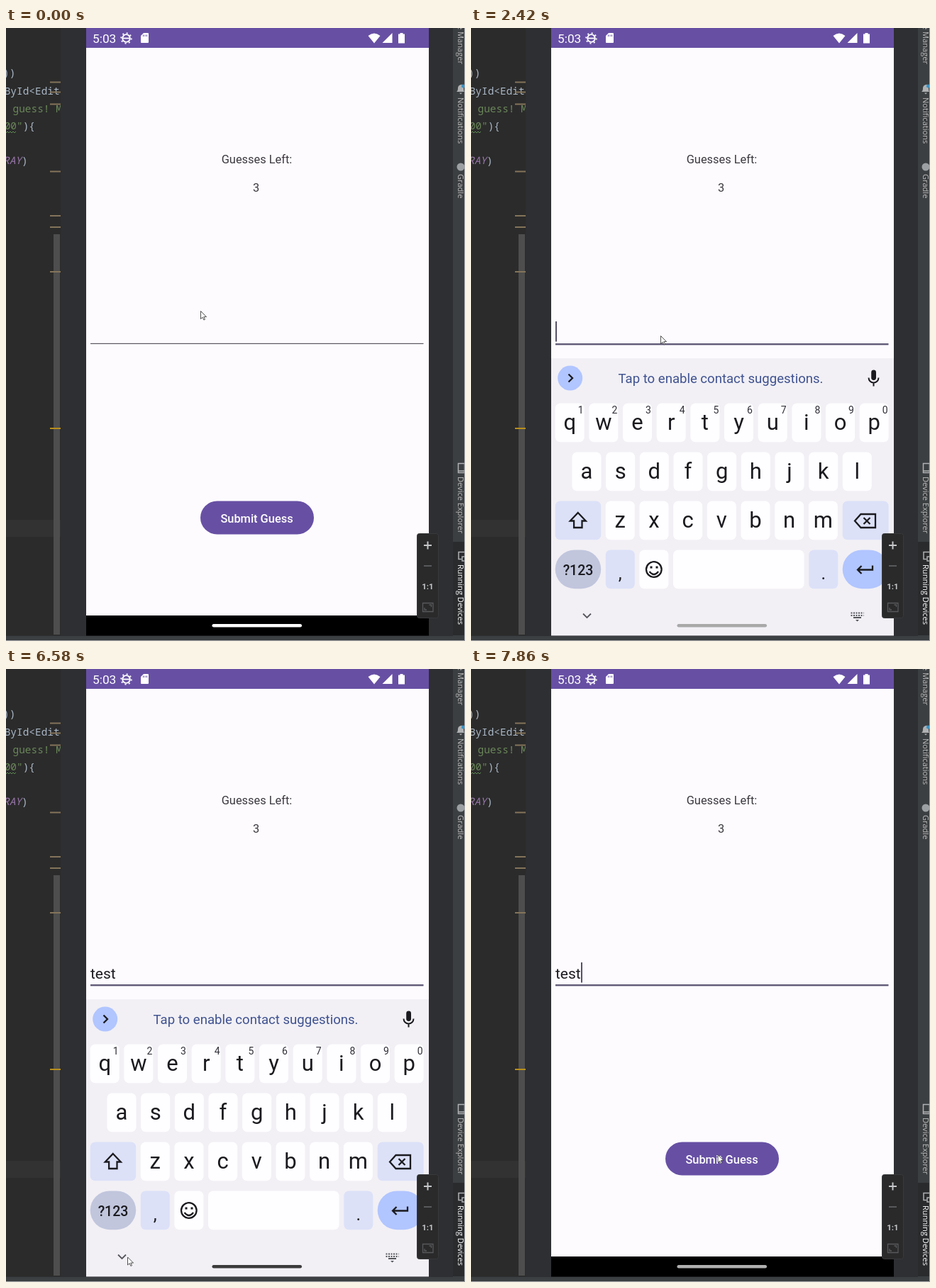
Animation, 647 px wide and 865 px high, one loop 7990 ms. Source, as an HTML page:

```html
<!DOCTYPE html>
<html lang="en">
<head>
<meta charset="utf-8">
<title>Guess input</title>
<style>
  html, body { margin: 0; width: 100%; height: 100%; overflow: hidden; background: #2e2f32; }
  svg { display: block; width: 647px; height: 865px; }
  text { font-family: Roboto, sans-serif; white-space: pre; }
  .mid { text-anchor: middle; }
  .code text { font: 14.45px "Noto Sans Mono", monospace; fill: #a9b7c6; }
  .side text { font: 11.1px "Open Sans", sans-serif; fill: #bbb; }
  .line { fill: none; stroke-width: 2.3; stroke: #1b1b1f; }
</style>
</head>
<body>
<svg viewBox="0 0 647 865">
  <defs>
    <clipPath id="editorClip"><path d="M0 0H77V857H0Z"/></clipPath>
    <clipPath id="phoneClip"><path d="M113 0H596V857.5H113Z"/></clipPath>
  </defs>

  <!-- Editor -->
  <g clip-path="url(#editorClip)" class="code">
    <path fill="#2b2b2b" d="M0 0H77V857H0Z"/>
    <path fill="#323232" d="M0 694H77V718H0Z"/>
    <text x="-4" y="68">))</text>
    <text x="-2.3" y="94">ById&lt;Edit</text>
    <text x="9.5" y="119" style="fill:#6a8759">guess! M</text>
    <text x="-2.3" y="143"><tspan fill="#6a8759">00"</tspan>){</text>
    <text x="-4" y="192"><tspan fill="#9876aa" font-style="italic">RAY</tspan>)</text>
    <path fill="none" stroke="#5f8a53" d="M0 148l2-2 2 2 2-2 2 2 2-2 2 2 2-2"/>
    <path fill="#4e4e4e" d="M67 291H76V856H67Z"/>
    <path stroke="#84745a" stroke-width="2" d="M62 76.5h15m-15 14h15m-15 17h15m-15 95h15m-15 62.500h15m-15 16h15m-15 63h15"/>
    <path stroke="#b98f1c" stroke-width="2" d="M62 565h15"/>
  </g>

  <!-- Tool strip -->
  <g class="side">
    <path fill="#3c3f41" d="M630 0H647V865H630ZM0 858H647V865H0Z"/>
    <path fill="#292b2d" d="M630 725H647V857H630Z"/>
    <text transform="translate(637 -4) rotate(90)">e Manager</text>
    <text transform="translate(637 98) rotate(90)">Notifications</text>
    <text transform="translate(637 206) rotate(90)">Gradle</text>
    <text transform="translate(637 633) rotate(90)">Device Explorer</text>
    <text transform="translate(637 757) rotate(90)" style="fill:#fff">Running Devices</text>
    <path fill="#afb1b3" d="M635 90q2-1 2-5t4-5 4 5 2 5ZM639 91.500h4l-2 2Z"/>
    <circle cx="644.500" cy="82" r="2.500" fill="#3592c4"/>
    <circle cx="641" cy="196" r="5.500" fill="#9da0a2"/>
    <path fill="none" stroke="#afb1b3" stroke-width="1.500" d="M637.500 614.500h9v13h-9ZM637 625h10M646 739.500h-8v10h4M643 746h4v6h-4Z"/>
    <path fill="none" stroke="#a8a9aa" d="M646.500 0V864.500H0"/>
  </g>

  <!-- Phone -->
  <g clip-path="url(#phoneClip)">
    <path fill="#fefbff" d="M113 0H596V829H113Z"/>
    <path fill="#6750a4" d="M113 0H596V28H113Z"/>
    <path d="M113 829H596V858H113Z"/>
    <g fill="#fff">
      <text x="122" y="20.500" font-size="17.300">5:03</text>
      <g fill="none" stroke="#fff">
        <circle cx="169.500" cy="14.500" r="5.300" stroke-width="1.800"/>
        <circle cx="169.500" cy="14.500" r="7.200" stroke-width="2" stroke-dasharray="2 3.650"/>
        <path stroke-width="1.800" d="M164 14.500h11"/>
      </g>
      <path d="M194 7h6q1 0 1 1v12q0 1-1 1h-9q-1 0-1-1v-9Z"/>
      <path d="M510.500 11Q519 4 527.500 11L519 21.500ZM544.500 7V21H530.500ZM555.500 8.500V7h4v1.500h2.500V21.500h-9V8.500Z"/>
      <path stroke="#6750a4" d="M193.500 9.500v2.500m2.500-2.500v2.500m2.500-2.500v2.500"/>
    </g>
    <g class="mid" font-size="16.400" fill="#3b383e">
      <text x="353.500" y="191">Guesses Left:</text>
      <text x="352.500" y="230.500">3</text>
      <rect x="274" y="667.500" width="160" height="47" rx="23.500" fill="#6750a4"/>
      <text x="353.500" y="697.500" font-weight="500" fill="#fff">Submit Guess</text>
    </g>
    <rect id="fieldLine" x="119" width="469.500"/>
    <text id="typed" x="119" y="436.500" font-size="21" fill="#1c1b1f"></text>
    <rect id="composing" x="119" y="438.500" height="1.300" fill="#1c1b1f"/>
    <rect id="caret" y="414" width="2" height="28.500" fill="#55506a"/>

    <g id="keyboard">
      <path fill="#f2f0f5" d="M113 466H596V858H113Z"/>
      <circle cx="139.700" cy="494" r="17.500" fill="#b1c5ff"/>
      <path class="line" d="M137.500 488.500l5.500 5.500-5.500 5.500"/>
      <text class="mid" x="352" y="501" font-size="18.570" fill="#3f5290">Tap to enable contact suggestions.</text>
      <rect x="564.200" y="482.500" width="6.800" height="14.500" rx="3.400" fill="#1b1b1f"/>
      <path class="line" style="stroke-width:2" d="M560.500 493.500a7 7 0 0 0 14 0M567.500 500.500v5"/>
      <g id="keys"></g>
      <path class="line" d="M150.800 684l11 11.500h-5.300v9.500h-11.400v-9.500h-5.300Z"/>
      <path class="line" d="M549.500 686h20.500v19h-20.500l-8.500-9.500ZM553.500 691l9 9m0-9l-9 9"/>
      <g class="line">
        <circle cx="257.800" cy="764" r="10.800"/>
        <path d="M251.500 767q6.300 8 12.600 0"/>
        <path stroke-width="3" d="M252.500 761h3m5 0h3"/>
      </g>
      <path class="line" d="M566 758.500v6h-20.500M550.500 759l-5.500 5.500 5.500 5.500"/>
      <path class="line" style="stroke:#55565c;stroke-width:1.800" d="M158 826.500l5.500 5.500 5.500-5.500"/>
      <path fill="none" stroke="#55565c" stroke-width="2" stroke-dasharray="2 1.500" d="M535.500 825.500h18m-18 3.500h18"/>
      <path fill="#55565c" d="M539 831h11v2h-11ZM542 835h5l-2.500 2.500Z"/>
      <rect id="ripple" x="110" y="801" width="106" height="70" rx="30" opacity=".15"/>
    </g>
    <rect id="handle" x="290.500" y="841" width="126.500" height="4.500" rx="2.250"/>
  </g>

  <!-- Zoom panel -->
  <g>
    <rect x="579.500" y="713.500" width="30" height="119" rx="3" fill="#2a2a2b" stroke="#38393b"/>
    <path stroke="#c4c6c8" stroke-width="2" d="M589 730h11m-5.500-5.500v11"/>
    <path stroke="#58595b" stroke-width="2" d="M589 759h11"/>
    <text class="mid" x="594.500" y="792" font-size="11.500" font-weight="700" fill="#c4c6c8">1:1</text>
    <path fill="none" stroke="#58595b" stroke-width="1.300" d="M587.500 811.500h14.500v12h-14.500ZM590 818v3h3m3.500-7h3v3"/>
  </g>

  <path id="pointer" fill="#fff" stroke="#333" stroke-width=".85" d="M.5.5V11.500L3.100 9.200 4.900 13 6.500 12.200 4.800 8.600H8.500Z"/>
</svg>

<script>
const LOOP = 7990;
const $ = id => document.getElementById(id);
const set = (el, attrs) => { for (const k in attrs) el.setAttribute(k, attrs[k]); };
const add = (tag, attrs, content = '') => {
  const el = document.createElementNS('http://www.w3.org/2000/svg', tag);
  set(el, attrs);
  el.textContent = content;
  $('keys').append(el);
};

// Keyboard layout
const PITCH = 47.67, KEY = 41, WIDE = 64.5, ROW = 69;
const WHITE = '#fefdff', TINT = '#dce1f8', BLUE = '#b1c5ff', GREY = '#c1c6dd';

function key(row, x, width, fill, radius = 7) {
  add('rect', { x, y: 529.5 + row * ROW, width, height: 54.7, rx: radius, fill });
}
function label(content, x, y, size, weight = 400, fill = '#1b1b1f') {
  add('text', { x, y, 'font-size': size, 'font-weight': weight, fill, class: 'mid' }, content);
}
[['qwertyuiop', 139.2], ['asdfghjkl', 163], ['zxcvbnm', 210.3]].forEach(([letters, left], row) =>
  [...letters].forEach((letter, i) => {
    const x = left + i * PITCH;
    key(row, x - KEY / 2, KEY, WHITE);
    label(letter, x, 567 + row * ROW, 31);
    if (!row) label((i + 1) % 10, x + 15.5, 544, 14, 400, '#303038');
  }));
key(2, 118.7, WIDE, TINT);
key(2, 523.7, WIDE + .5, TINT);
key(3, 118.7, WIDE, GREY, 27.3);
key(3, 189.8, KEY, TINT);
key(3, 237.4, KEY, WHITE);
key(3, 285, 184.5, WHITE);
key(3, 476.3, KEY, TINT);
key(3, 523.7, WIDE + .5, BLUE, 27.3);
label('?123', 151, 772, 19.5, 500);
label(',', 210.3, 778, 25);
label('.', 496.8, 778, 25);

// Timing helpers
const clamp = v => Math.min(1, Math.max(0, v));
const between = (t, from, to) => t >= from && t < to;

function track(points, t) {
  const next = points.findIndex(p => p[0] > t);
  if (next === 0) return points[0].slice(1);
  if (next < 0) return points.at(-1).slice(1);
  const a = points[next - 1], b = points[next];
  const f = (t - a[0]) / (b[0] - a[0]);
  return a.slice(1).map((v, i) => v + (b[i + 1] - v) * f);
}
function bezier(x1, y1, x2, y2) {
  const at = (s, p, q) => 3 * (1 - s) ** 2 * s * p + 3 * (1 - s) * s * s * q + s ** 3;
  return x => {
    let lo = 0, hi = 1;
    for (let i = 0; i < 24; i++) {
      const mid = (lo + hi) / 2;
      if (at(mid, x1, x2) < x) lo = mid; else hi = mid;
    }
    return at(lo, y1, y2);
  };
}
const easeShow = bezier(.2, 0, 0, 1), easeHide = bezier(.4, 0, 1, 1);

// Timeline
const FOCUS = 1130, SHOW = 1743, HIDE = 6927, HIDE_END = HIDE + 200;
const pointerPath = [
  [270, 274, 399], [340, 272, 397], [520, 268, 415], [720, 262, 430], [920, 264, 433],
  [1950, 264, 433], [2100, 267, 434], [3490, 267, 434], [3610, 266, 431],
  [5740, 266, 431], [5830, 225, 660], [5910, 178, 851], [5960, 170, 834],
  [6460, 170, 834], [6700, 172, 825], [7200, 172, 825], [7400, 265, 745], [7590, 347.5, 685]
];
const handleShade = [
  [2130, 255], [2420, 168], [2610, 110], [2810, 80], [3280, 66], [3610, 62],
  [HIDE_END, 58], [7590, 145], [7860, 176]
];
const typing = [[3490, 't', 7], [3610, 'te', 18], [3790, 'tes', 29], [3880, 'test', 36]];
const caretToggles = [FOCUS, 1690, 2130, 2610, 3040, 4460, 5400, 5490, 5960, 6460, 6950, 7460, 7855];

function draw(t) {
  set($('fieldLine'), t >= FOCUS
    ? { y: 445, height: 2.4, fill: '#625b78' }
    : { y: 444.8, height: 1.2, fill: '#5b575f' });

  const [, word, width] = typing.findLast(p => t >= p[0]) || [0, '', 0];
  $('typed').textContent = word;
  const underlined = between(t, 3880, 4090) ? 29 : width;
  set($('composing'), { width: t < 4460 ? underlined : 0 });
  const caretOn = caretToggles.filter(time => t >= time).length % 2;
  set($('caret'), { x: 119 + width, opacity: caretOn });

  const shown = clamp((t - SHOW) / 290), hidden = clamp((t - HIDE) / 200);
  const offset = 391 * (1 - easeShow(shown) + easeHide(hidden));
  set($('keyboard'), {
    transform: `translate(0 ${offset})`,
    opacity: clamp(2 * shown) * clamp(1 - 1.5 * hidden)
  });
  set($('ripple'), { visibility: between(t, 6850, HIDE_END) ? 'visible' : 'hidden' });

  const [shade] = track(handleShade, t);
  set($('handle'), { fill: `rgb(${shade},${shade},${shade})` });
  set($('pointer'), { transform: `translate(${track(pointerPath, t)})` });
}

function frame() {
  draw(performance.now() % LOOP);
  requestAnimationFrame(frame);
}
frame();
</script>
</body>
</html>
```
